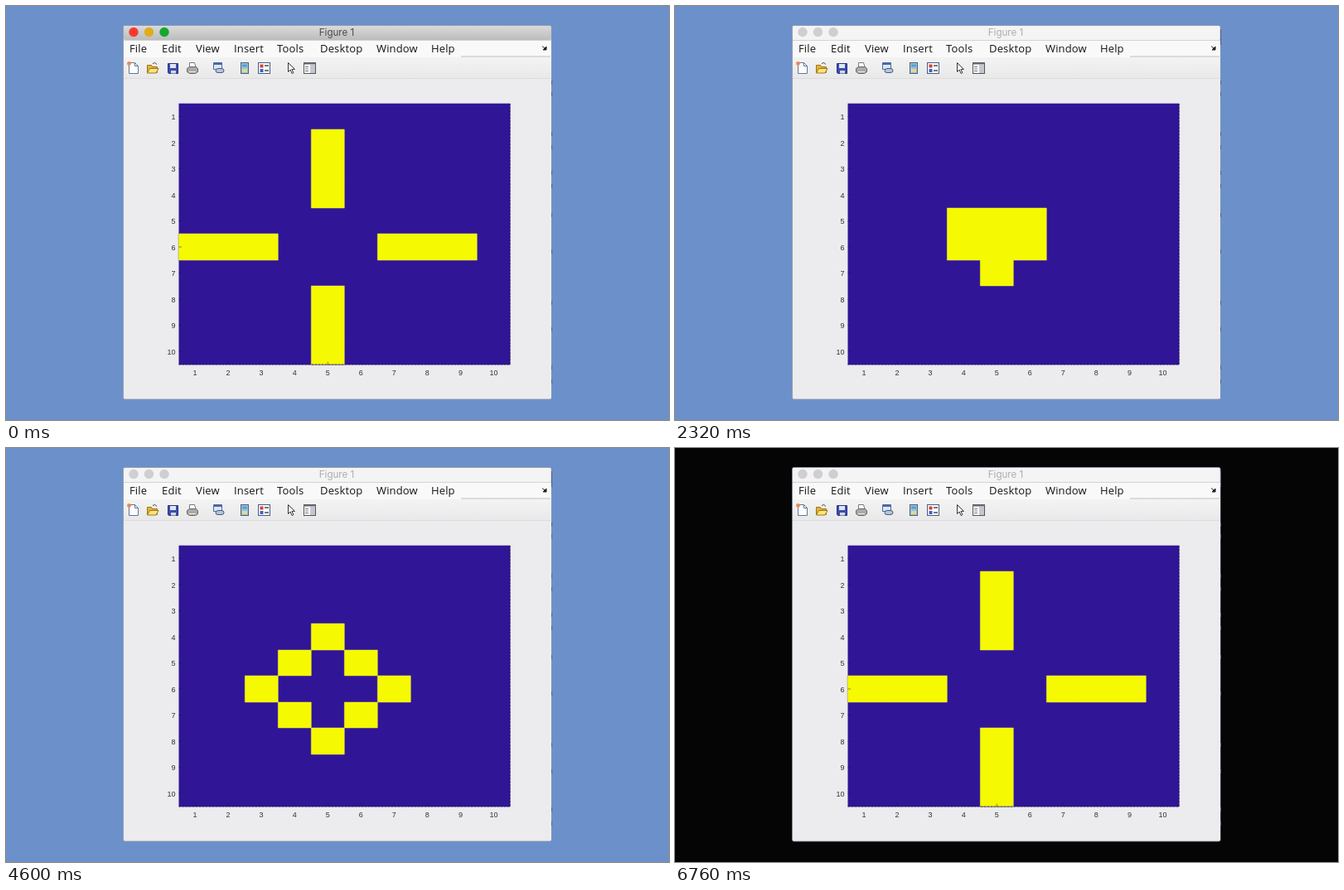
Recreate the animation shown at these times as an HTML page. Size 800x500 px, loop 6.8 s.

```html
<!DOCTYPE html>
<html lang="en">
<head>
<meta charset="utf-8">
<title>Game of Life figure</title>
<style>
  html, body { margin: 0; width: 100%; height: 100%; overflow: hidden; background: #6c91ca; }
  svg { display: block; }
  .menu { font: 13px "Open Sans", "Noto Sans", sans-serif; letter-spacing: .15px; fill: #151515; }
  .tick { font: 9px "Liberation Sans", Arial, sans-serif; fill: #333; }
  .title { font: 11.6px Inter, Roboto, sans-serif; text-anchor: middle; }
  .label { font: 10px Inter, Roboto, sans-serif; text-anchor: middle; fill: #a9c4e6; }
</style>
</head>
<body>
<svg width="800" height="500" viewBox="0 0 800 500">
  <defs>
    <linearGradient id="bar" x2="0" y2="1">
      <stop stop-color="#dadada"/><stop offset="1" stop-color="#bcbcbc"/>
    </linearGradient>
    <linearGradient id="tools" x2="0" y2="1">
      <stop stop-color="#f3f3f3"/><stop offset="1" stop-color="#e9e9ea"/>
    </linearGradient>
  </defs>
  <rect id="desk" width="800" height="500"/>

  <!-- window behind, peeking out on the right -->
  <path id="peek" stroke="#3c4a68" stroke-width="1.5"/>
  <path id="strip" d="M658.3 28V47" stroke="#33446e" stroke-width="1.5"/>

  <rect x="141.5" y="23.5" width="516.5" height="451.5" rx="2" fill="#ecebed" stroke="#8a94a8" stroke-width=".8"/>
  <path d="M657.2 42V474" stroke="#fafafc"/>
  <rect id="titleBar" x="142" y="24" width="515.5" height="17" rx="2"/>
  <rect x="142" y="41" width="515.5" height="21" fill="#f9f9f9"/>
  <path d="M142 41.5H657.5" stroke="#c9c9c9" stroke-width=".8"/>
  <path d="M549 61H657" stroke="#bdbdbd"/>
  <rect x="142" y="62" width="515.5" height="25" fill="url(#tools)"/>
  <path d="M142 87.5H657.5" stroke="#dcdcdd"/>
  <g id="lights"></g>
  <text id="title" class="title" x="399" y="36">Figure 1</text>
  <g id="menu" class="menu"></g>
  <path d="M647 48.5l4 3.5m1-3v4h-4z" stroke="#222" fill="#222"/>

  <!-- toolbar -->
  <g stroke-width="1">
    <path d="M148.500 68.500h7l4 4v9h-11z" fill="#fff" stroke="#5d7899"/>
    <path d="M155.500 68.500v4h4" fill="none" stroke="#5d7899"/>
    <circle cx="148.500" cy="69.500" r="2.400" fill="#e58b55"/>
    <path d="M170.500 80.500v-9h5l1 2h6v7z" fill="#e5b335" stroke="#9a7420"/>
    <path d="M170.500 81l3-5.500h10.500l-3 5.500z" fill="#ffe478" stroke="#9a7420"/>
    <path d="M177 69.500q3-2.500 5 1" fill="none" stroke="#445"/>
    <path d="M195.500 69.500h12v12h-11l-1-1z" fill="#3c4db0" stroke="#27327e"/>
    <path d="M198 70h7v5h-7z" fill="#dfe6f6"/><path d="M199 78h6v3.500h-6z" fill="#d5d8e2"/>
    <path d="M221.500 75v-6.500h6l2 6.500" fill="#fff" stroke="#777"/>
    <path d="M218.500 75.500l3-2h8l2 2v4l-3 2h-7l-3-2z" fill="#aaa" stroke="#666"/>
    <path d="M221 79.500h8" stroke="#f3f3d0"/>
    <path d="M250.500 68.500h10v8h-10z" fill="#dbe6f7" stroke="#4c68a0"/>
    <path d="M250 70h11" stroke="#4c68a0" stroke-width="2"/>
    <path d="M253 78.500q0-3 3-3h4q3 0 3 2.500t-3 2.500h-4q-3 0-3-2z" fill="#b7c5dd" stroke="#44597f"/>
    <rect x="283.500" y="68.500" width="9" height="13" fill="#8fc4e6" stroke="#555f70"/>
    <path d="M285 76h6v4h-6z" fill="#e9d58a"/><path d="M285 72h6" stroke="#5e9cd0" stroke-width="3"/>
    <rect x="304.500" y="68.500" width="14" height="13" fill="#fff" stroke="#475a86"/>
    <path d="M306.500 72.500h4" stroke="#d0433a" stroke-width="4"/>
    <path d="M306.500 78h4" stroke="#3d62c8" stroke-width="4"/>
    <path d="M312 72h5m-5 6h5" stroke="#777" stroke-width="2"/>
    <path d="M340.500 68.500v11l2.600-2.500 2 4.500 1.800-.8-2-4.300h3.500z" fill="#fff" stroke="#333"/>
    <rect x="359.500" y="68.500" width="14" height="13" fill="#fff" stroke="#555"/>
    <path d="M359 69.500h15" stroke="#667" stroke-width="2"/>
    <path d="M361 73.500h4m-4 2.500h4m-4 2.500h4" stroke="#777"/>
    <path d="M367 71h6v10h-6z" fill="#c3c7cf"/>
  </g>

  <!-- axes tools -->
  <g id="axesTools" fill="none" stroke="#d2d1d4" stroke-width="1.400">
    <path d="M501 113h9M502 111q2-6 8-6m-3-4l5 4-4 4"/>
    <path d="M519.500 102h13v11h-13zM523 105.500h7m-7 3h7"/>
    <path d="M540 113l-3-6 2-1 2 2v-6h2v5-6h2v6-5h2v5l1-3h2l-1 7-2 3z"/>
    <circle cx="561" cy="106" r="5"/><path d="M565 110l4 4m-11-8h6m-3-3v6"/>
    <circle cx="579.500" cy="106" r="5"/><path d="M583.500 110l4 4m-11-8h6"/>
    <path d="M592 107l7-6 7 6m-12-1v8h4v-4h3v4h3v-8"/>
  </g>

  <!-- plot -->
  <rect x="208.500" y="117.700" width="399.800" height="315.500" fill="#301596"/>
  <path id="cells" fill="#f5fa02" stroke="#8d7c80" paint-order="stroke"/>
  <path id="marks" stroke="#1d1450" stroke-opacity=".65" stroke-width=".8"/>
  <path d="M208.500 433H608.200V118" fill="none" stroke="#1c1058" stroke-width=".8" stroke-dasharray="3 1"/>
  <g id="ticks" class="tick"></g>

  <g id="dock">
    <path d="M285.500 500V485q0-2.500 2.500-2.500h44q2.500 0 2.500 2.500v15z" fill="#41618f" stroke="#36527c"/>
    <text class="label" x="310" y="495">Melvio</text>
  </g>
</svg>
<script>
const LOOP = 6800, START = 1550, STEP = 510, SIZE = 10;
const $ = id => document.getElementById(id);
const show = (id, on) => $(id).style.display = on ? "" : "none";
const range = Array.from({ length: SIZE }, (_, i) => i);

// Conway's Game of Life, from a T of four cells to the blinking traffic light
function evolve(cells) {
  const alive = (r, c) => cells.some(([y, x]) => y === r && x === c);
  return range.flatMap(r => range.map(c => [r, c])).filter(([r, c]) => {
    const near = cells.filter(([y, x]) => Math.max(Math.abs(y - r), Math.abs(x - c)) === 1).length;
    return near === 3 || near === 2 && alive(r, c);
  });
}

const edge = r => Math.round(117.6 + 31.5 * r);
const outline = cells => cells.map(([r, c]) =>
  `M${208.3 + 40 * c} ${edge(r)}h40V${edge(r + 1)}h-40z`).join("");

const generations = [[[4, 4], [5, 3], [5, 4], [5, 5]]];
while (generations.length < 11) generations.push(evolve(generations.at(-1)));
const paths = generations.map(outline);

const menu = { File: 149, Edit: 188, View: 229, Insert: 275, Tools: 327, Desktop: 379, Window: 447, Help: 513 };
$("menu").innerHTML = Object.entries(menu).map(([s, x]) => `<text x="${x}" y="56">${s}</text>`).join("");
$("lights").innerHTML = [154, 172.5, 191].map(x => `<circle cx="${x}" cy="31.500" r="5.700"/>`).join("");
$("ticks").innerHTML = range.map(i =>
  `<text x="${228 + 40.05 * i}" y="446" text-anchor="middle">${i + 1}</text>` +
  `<text x="204.500" y="${137 + 31.55 * i}" text-anchor="end">${i + 1}</text>`).join("");
$("marks").setAttribute("d", range.map(i =>
  `M${228.3 + 40 * i} 433v-3.500M208.500 ${133.5 + 31.5 * i}h3.500`).join(""));
$("peek").setAttribute("d", [90, 104, 152, 168, 199, 215, 250, 294, 356, 388, 434, 451]
  .map(y => `M658.300 ${y}v5`).join(""));

function draw(t) {
  const active = t < 400;
  const gen = t < START ? 10 : Math.min(10, Math.floor((t - START) / STEP));
  $("cells").setAttribute("d", paths[gen]);
  $("desk").setAttribute("fill", t < 6740 ? "#6c91ca" : "#050505");
  $("titleBar").setAttribute("fill", active ? "url(#bar)" : "#f4f4f4");
  $("title").setAttribute("fill", active ? "#4a4a4a" : "#adadad");
  [...$("lights").children].forEach((light, i) =>
    light.setAttribute("fill", active ? ["#fb3a30", "#e0ac1c", "#14a82c"][i] : "#d0ced0"));
  show("strip", !active);
  show("axesTools", !active && t < START);
  show("dock", t >= 700 && t < 1080);
}

function frame() {
  draw(performance.now() % LOOP);
  requestAnimationFrame(frame);
}
frame();
</script>
</body>
</html>
```
